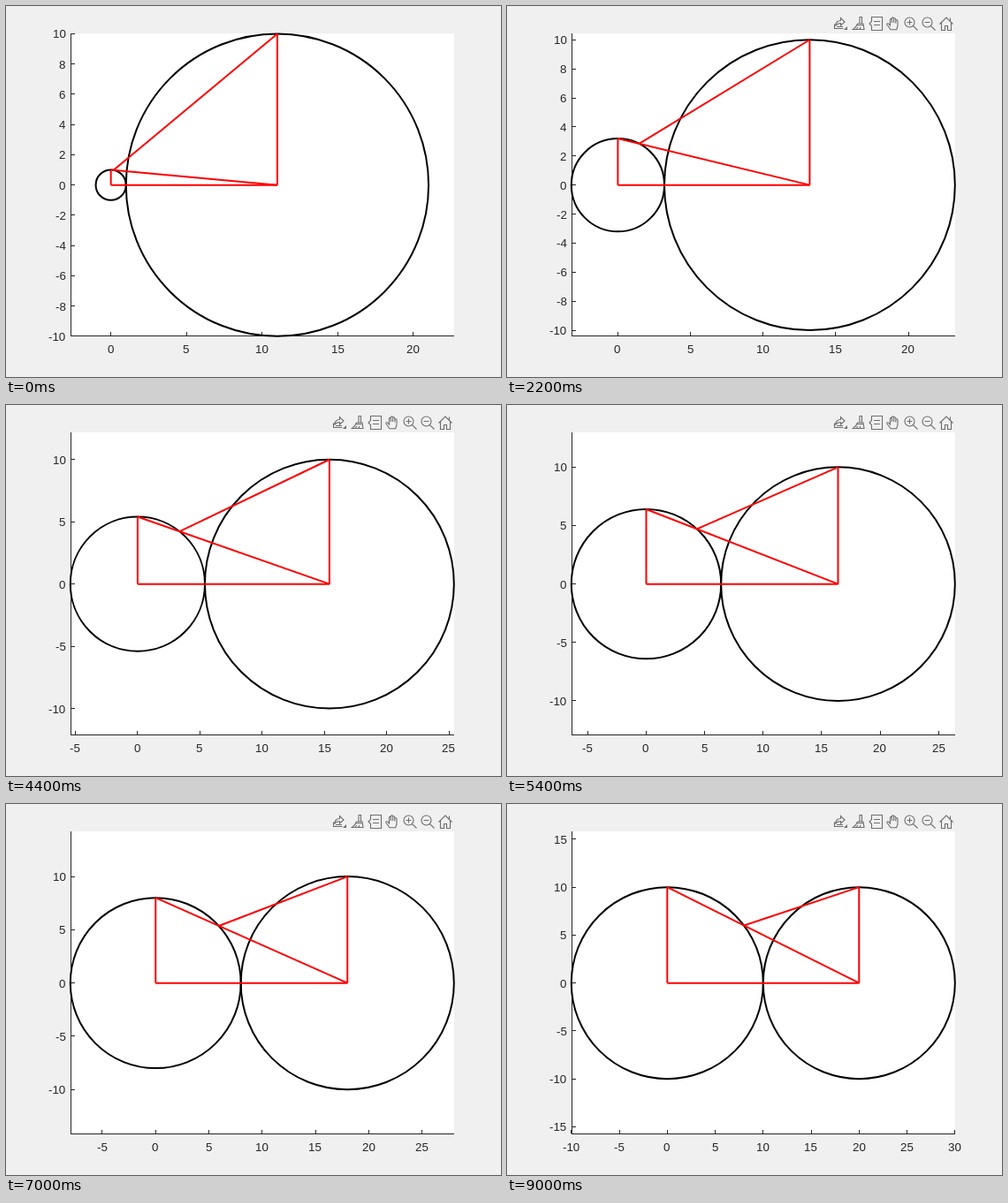
Animation of 560x420 px, one loop 9.1 s. Source, as an HTML page with a canvas:

```html
<!DOCTYPE html>
<html lang="en">
<head>
<meta charset="utf-8">
<title>Tangent circles</title>
<style>
html, body { margin: 0; width: 100%; height: 100%; overflow: hidden; background: #f0f0f0; }
canvas { display: block; }
</style>
</head>
<body>
<canvas id="c" width="560" height="420"></canvas>
<script>
const ctx = document.getElementById('c').getContext('2d');
const STEP = 100, STEPS = 91;
const W = 434, H = 342.3;        // plot area
const CX = 289.8, CY = 202.65;   // its centre, at data point (10, 0)
const R = 10;                    // radius of the large circle
const INK = '#262626', EPS = 1e-6;

// Toolbar icons, each in a 16 px box: [left, path]
const icons = [
  [369, 'M1.5 8.5V13.5H11.5M2.5 10.5C3 6.5 5.5 4.5 8.5 4.5V1.5L13 6L8.5 10V7.5C6 7.5 4 8.5 2.5 10.5M4 11.5H11'],
  [390, 'M9 .5H11.5V8H9ZM6.5 8H13L14 14.5H1.5C4 13 5.5 11 6.5 8M6 9.8H13.2M5 14.5L7 12M9 14.5L9.8 12'],
  [409, 'M3.5 .5H15.5V15.5H3.5V10.5L1 8L3.5 5.5ZM6 5.5H13M6 9.5H13'],
  [429, 'M5 14.8L1 9.2C.2 8 1.8 7.2 2.8 8.2L4.5 10V3.5C4.5 2 6.3 2 6.4 3.5V7V2C6.5 .5 8.5 .5 8.6 2V7V2.8C8.7 1.3 10.7 1.3 10.8 2.8V7.5V4.8C11 3.4 13 3.4 13 5V10C13 12 12 13 11.7 14.8Z'],
  [449, 'M12 6.5A5.5 5.5 0 1 1 1 6.5A5.5 5.5 0 1 1 12 6.5M10.4 10.4L15.5 15.5M3.5 6.5H9.5M6.5 3.5V9.5'],
  [469, 'M12 6.5A5.5 5.5 0 1 1 1 6.5A5.5 5.5 0 1 1 12 6.5M10.4 10.4L15.5 15.5M3.5 6.5H9.5'],
  [489, 'M.5 8.5L8 1L15.5 8.5M2.5 7V15.5H6.5V10.5H9.5V15.5H13.5V7M12.5 5V1.5']
].map(([x, d]) => [x, new Path2D(d)]);

function drawToolbar() {
  ctx.strokeStyle = ctx.fillStyle = '#6e6e6e';
  ctx.lineWidth = 1.1;
  for (const [x, path] of icons) {
    ctx.save();
    ctx.translate(x, 12);
    ctx.stroke(path);
    ctx.restore();
  }
  ctx.beginPath();
  ctx.moveTo(385, 23);
  ctx.lineTo(385, 27);
  ctx.lineTo(381, 27);
  ctx.fill();
}

function drawAxes(scale) {
  ctx.fillStyle = '#fff';
  ctx.fillRect(73, 31, W, 343);
  ctx.fillStyle = INK;
  ctx.fillRect(73, 31, 1, 343);
  ctx.fillRect(73, 373, W, 1);
  ctx.font = '13.333px "Liberation Sans", Arial, sans-serif';

  const halfX = W / 2 / scale + EPS, halfY = H / 2 / scale + EPS;
  for (let v = Math.ceil((10 - halfX) / 5) * 5; v <= 10 + halfX; v += 5) {
    const x = CX + (v - 10) * scale;
    ctx.fillRect(Math.min(506, Math.floor(x)), 369, 1, 4);
    ctx.fillText(v, Math.round(x - ctx.measureText(v).width / 2 - 0.3), 393);
  }
  const step = halfY < 12 ? 2 : 5;
  for (let v = -Math.floor(halfY / step) * step; v <= halfY; v += step) {
    const y = CY - v * scale;
    ctx.fillRect(74, Math.min(373, Math.floor(y)), 4, 1);
    ctx.fillText(v, Math.round(67.6 - ctx.measureText(v).width), Math.round(y + 5));
  }
}

function draw(n) {
  const r = 1 + n / 10, d = R + r;
  const scale = Math.min(H / (2 * R), W / (2 * d));
  const px = x => CX + (x - 10) * scale, py = y => CY - y * scale;

  const circle = (x, rad) => {
    ctx.beginPath();
    ctx.arc(px(x), py(0), rad * scale, 0, 2 * Math.PI);
    ctx.stroke();
  };
  const line = (x1, y1, x2, y2) => {
    ctx.beginPath();
    ctx.moveTo(px(x1), py(y1));
    ctx.lineTo(px(x2), py(y2));
    ctx.stroke();
  };

  ctx.fillStyle = '#f0f0f0';
  ctx.fillRect(0, 0, 560, 420);
  drawAxes(scale);

  ctx.lineWidth = 2;
  ctx.strokeStyle = '#000';
  circle(0, r);
  circle(d, R);

  // where the slanted line meets the small circle again
  const k = 2 * r * r / (d * d + r * r);
  ctx.strokeStyle = '#f00';
  line(0, 0, d, 0);
  line(0, 0, 0, r);
  line(d, 0, d, R);
  line(0, r, d, 0);
  line(d, R, k * d, r - k * r);

  if (n > 0) drawToolbar();
}

const start = performance.now();
function tick() {
  const t = Math.max(0, performance.now() - start);
  draw(Math.floor(t / STEP) % STEPS);
  requestAnimationFrame(tick);
}
tick();
</script>
</body>
</html>
```
